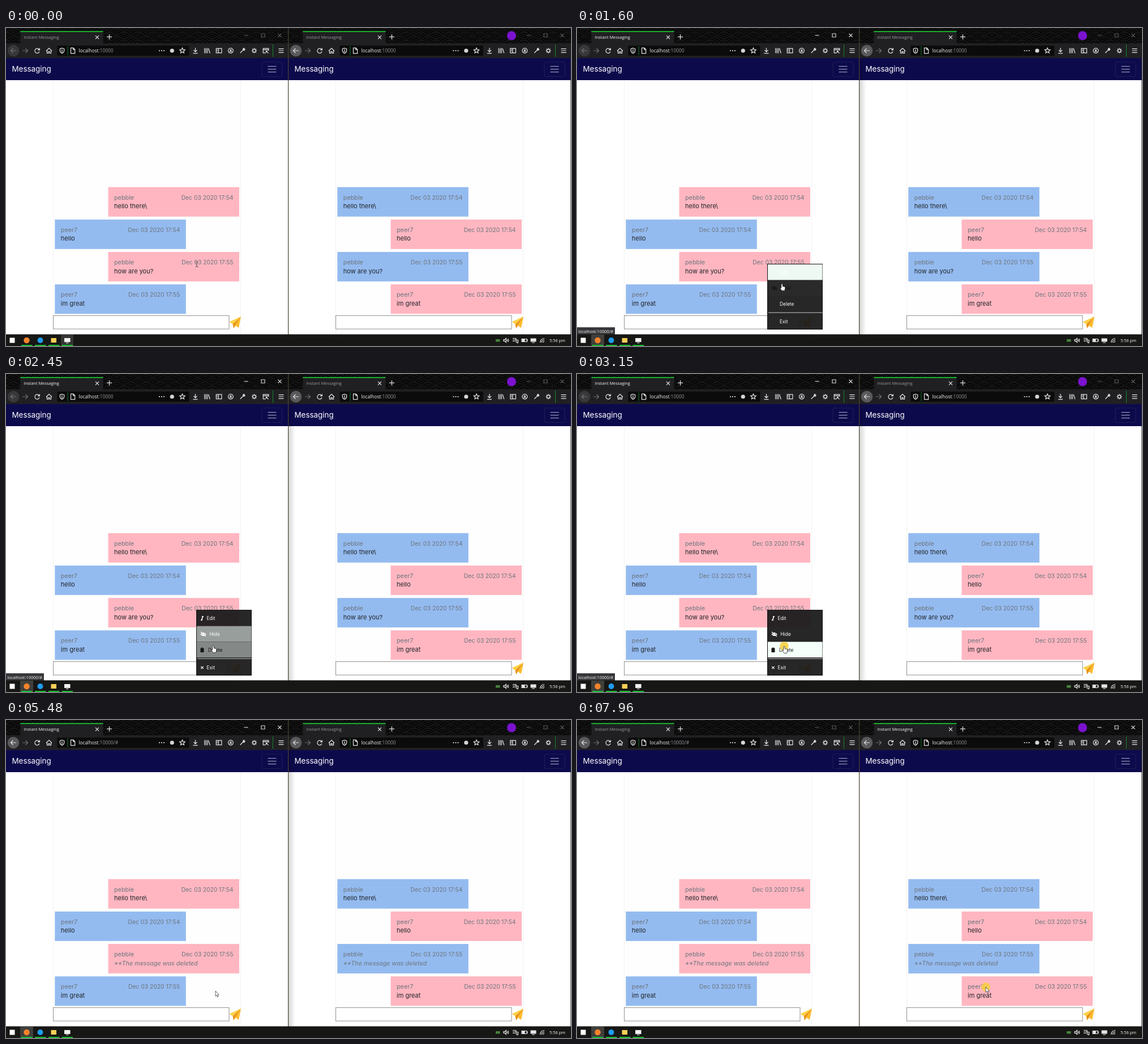
Animation of 998x561 px, one loop 8000 ms. Source, as an HTML page:

```html
<!DOCTYPE html>
<html lang="en">
<head>
<meta charset="utf-8">
<title>Instant Messaging</title>
<style>
html, body { margin: 0; width: 100%; height: 100%; overflow: hidden; background: #fff; }
svg { display: block; width: 100vw; height: 100vh; }
text { font-family: Inter, "Open Sans", sans-serif; font-size: 10.8px; white-space: pre; }
.ui { font-family: "Open Sans", "Noto Sans", sans-serif; font-size: 7.4px; }
.url { font-size: 8.4px; }
.muted { fill: #6c757d; }
.time { font-size: 10.3px; text-anchor: end; }
.body { fill: #212529; font-size: 11px; }
.gone { fill: #6c757d; font-style: italic; }
.item { font-size: 8.4px; }
.icon { fill: none; stroke: #e6e6e8; stroke-width: 1.2; }
</style>
</head>
<body>
<svg id="stage" viewBox="0 0 998 561" preserveAspectRatio="none"></svg>
<script>
const LOOP = 8000;
const stage = document.getElementById('stage');
const $ = id => document.getElementById(id);

const rect = (x, y, w, h, fill, more = '') =>
  `<rect x="${x}" y="${y}" width="${w}" height="${h}" fill="${fill}" ${more}/>`;
const dot = (x, y, r, fill, more = '') =>
  `<circle cx="${x}" cy="${y}" r="${r}" fill="${fill}" ${more}/>`;
const text = (x, y, s, cls, more = '') =>
  `<text x="${x}" y="${y}" class="${cls}" ${more}>${s}</text>`;
const icon = (x, y, d, more = '') =>
  `<path class="icon" transform="translate(${x} ${y})" d="${d}" ${more}/>`;

const circle = r => `M${-r} 0a${r} ${r} 0 1 0 ${2 * r} 0a${r} ${r} 0 1 0 ${-2 * r} 0`;
const spokes = Array.from({ length: 8 }, (_, i) => {
  const a = i * Math.PI / 4, c = Math.cos(a), s = Math.sin(a);
  return `M${(3 * c).toFixed(2)} ${(3 * s).toFixed(2)}L${(4.7 * c).toFixed(2)} ${(4.7 * s).toFixed(2)}`;
}).join('');
const starPath = 'M' + Array.from({ length: 10 }, (_, i) => {
  const r = i % 2 ? 2.3 : 5, a = (i / 5 - .5) * Math.PI;
  return `${(r * Math.cos(a)).toFixed(2)} ${(r * Math.sin(a)).toFixed(2)}`;
}).join('L') + 'Z';

const GLYPH = {
  back: 'M5 0H-4.5M-.5-4L-4.5 0L-.5 4',
  forward: 'M-5 0H4.5M.5-4L4.5 0L.5 4',
  reload: 'M3.5-2A4.1 4.1 0 1 0 4 1.5M4.4-4.6V-1.3H1',
  home: 'M-5 .5L0-4.5L5 .5M-3.5 0V4.5H-1V1.5H1V4.5H3.5V0',
  shield: 'M0-4.5L3.7-3.3V0Q3.5 3 0 4.7Q-3.5 3-3.7 0V-3.3ZM0-2.5V2.7',
  page: 'M-3.5-4.8H1L3.7-2V4.8H-3.5ZM.8-4.8V-1.8H3.7',
  star: starPath,
  download: 'M0-5V2M-3-1L0 2.2L3-1M-4 4.7H4',
  library: 'M-4.5-4.5V4.5M-2-4.5V4.5M.5-4.5V4.5M2.2-4L5 4.5',
  sidebar: 'M-4.8-3.8H4.8V3.8H-4.8ZM-.8-3.8V3.8M-3.6-1.5H-2M-3.6.5H-2',
  account: circle(4.4) + 'M-2.5 2.5Q0 .5 2.5 2.5M-1-1.3H1V0H-1Z',
  wrench: 'M-4 4L1-1M1-1Q.5-4 3-4.3L2.3-2.3L4.3-2.6Q4 0 1-1',
  gear: circle(2.7) + spokes,
  capture: 'M4.8 0V-3.8H-4.8V3.8H0M-4.8-1.7H4.8M.5.7L4.5 4.7M.5 3V.7H3',
  burger: 'M-4.5-3.3H4.5M-4.5 0H4.5M-4.5 3.3H4.5',
  plus: 'M-4.5 0H4.5M0-4.5V4.5',
  close: 'M-3-3L3 3M3-3L-3 3'
};

const PINK = '#ffb6c1', BLUE = '#94bbf0';
const NAMES = ['pebble', 'peer7'];
const CHAT = [[0, '54', 'hello there\\'], [1, '54', 'hello'], [0, '55', 'how are you?'], [1, '55', 'im great']];

function bubble([who, minute, words], row, me) {
  const mine = who === me, x = mine ? 180.5 : 86.3, y = 280.7 + row * 57.2;
  const body = row === 2
    ? text(x + 10.5, y + 37.5, words, 'body live') + text(x + 10.5, y + 37.5, '**The message was deleted', 'gone')
    : text(x + 10.5, y + 37.5, words, 'body');
  return rect(x, y, 231.5, 52, mine ? PINK : BLUE)
    + text(x + 10.5, y + 22, NAMES[who], 'muted')
    + text(x + 221, y + 22, `Dec 03 2020 17:${minute}`, 'muted time') + body;
}

function browser(me, x0) {
  const id = me ? 'right' : 'left';
  const shift = me ? 20.5 : 0;
  const tools = ['download', 'library', 'sidebar', 'account', 'wrench', 'gear'];
  const bold = 'stroke-width="1.5"';
  return `<g transform="translate(${x0} 0)">`
    + rect(0, 0, 499, 561, '#fff')
    + rect(0, 0, 499, 28, '#050505') + rect(0, 0, 499, 28, 'url(#scales)')
    + rect(25.5, 5.5, 146, 22.5, '#202022') + rect(25.5, 5.5, 146, 1.6, '#16d52f')
    + text(31.5, 19, 'Instant Messaging', 'ui', `id="${id}Title"`)
    + icon(161, 16.3, GLYPH.close, bold) + icon(182.5, 15.7, GLYPH.plus, bold)
    + (me ? dot(394, 13.5, 8, '#7b12cf') : '')
    + `<g id="${id}Buttons">${icon(424, 13, 'M-3.5 0H3.5', 'stroke-width="1"')}
       ${icon(454, 13, 'M-3-3H3V3H-3Z', 'stroke-width="1"')}${icon(483.5, 13, GLYPH.close, 'stroke-width="1"')}</g>`
    + rect(0, 27, 499, 26, '#202022')
    + `<g id="${id}Back">${dot(13, 40, 10.3, '#5a5a5d')}${icon(13, 40, GLYPH.back, bold)}</g>`
    + icon(34, 40, GLYPH.forward, 'opacity=".4"')
    + icon(55, 40, GLYPH.reload, bold) + icon(76, 40, GLYPH.home, bold)
    + rect(90.5, 31, 233 + shift, 18, '#0b0b0c', 'rx="1.5"')
    + icon(99, 40, GLYPH.shield) + rect(108.5, 32, 1, 16, '#13752a') + icon(118, 40, GLYPH.page)
    + `<text x="128.3" y="43" class="ui url" fill="#f4f4f5">localhost<tspan fill="#96969a">:10000</tspan>`
    + (me ? '' : '<tspan id="hash" fill="#96969a">/#</tspan>') + '</text>'
    + [-4, 0, 4].map(d => dot(275 + shift + d, 40, 1.1, '#e6e6e8')).join('')
    + dot(293.3 + shift, 40, 3.6, '#d5d5d8') + icon(311.5 + shift, 40, GLYPH.star)
    + tools.map((k, i) => icon(334.5 + shift + i * 20.8, 40, GLYPH[k], bold)).join('')
    + (me ? '' : icon(459, 40, GLYPH.capture))
    + rect(471, 29, 1, 22, '#17852f') + icon(486, 40, GLYPH.burger, bold)
    + rect(83.5, 80, 331, 470, '#fefefe', 'stroke="#f2f2f4"')
    + rect(0, 53, 499, 39, '#0d0a4c')
    + text(10.5, 77, 'Messaging', '', 'fill="#fff" style="font-size:13.4px"')
    + rect(452, 60, 36, 25.5, 'none', 'rx="3" stroke="#1d2059"')
    + icon(470, 72.7, 'M-7.5-5H7.5M-7.5 0H7.5M-7.5 5H7.5', 'style="stroke:#8f94b5"')
    + CHAT.map((m, i) => bubble(m, i, me)).join('')
    + rect(83.5, 507.3, 310.5, 23.7, '#fff', 'stroke="#858585" stroke-width=".9"')
    + `<path d="M415 509L394.5 518.5L400.5 522.5Z" fill="#ffd044"/><path d="M415 509L400.5 522.5L402 530L405 525.5Z" fill="#e8941a"/>
       <path d="M415 509L404.5 524.5L411 529Z" fill="#fdbb2c"/>`
    + '</g>';
}

function taskbar() {
  const lines = [27, 51, 75, 98.5].map(x => rect(x, 559, 19.5, 2, '#19bd34')).join('');
  return rect(0, 540.4, 998, 20.6, '#171715')
    + rect(25, 541, 23, 20, '#40403d', 'id="foxTask"') + rect(97, 541, 22, 20, '#353532', 'id="recTask"')
    + lines + rect(6.5, 546.5, 9, 9, '#fff')
    + dot(36.5, 551, 5.2, '#f5842c') + dot(60.5, 551, 5, '#1f9cf0')
    + rect(79.5, 547, 9.5, 8, '#f9cf56')
    + rect(103, 547, 10.5, 7, '#f3f3f3') + rect(106, 555, 4.5, 1, '#f3f3f3')
    + rect(865, 549, 7.5, 4.5, '#47813d')
    + icon(884, 551, 'M-5-1.3H-3L-.7-3.5V3.5L-3 1.3H-5ZM1-1.5Q2 0 1 1.5M2.5-3Q4.5 0 2.5 3', 'stroke-width="1"')
    + icon(900, 551, 'M-5-3.5H1M-5-1H1M-5 1.5H-1M1-3.5V3H4.5V-.5H0M2 4.5H5', 'stroke-width="1"')
    + icon(916, 551, 'M-5-2.5H4V2.5H-5ZM4-1H5V1H4', 'stroke-width="1"') + rect(911.5, 549, 5, 4, '#e6e6e8')
    + rect(926.5, 547.5, 10, 6, '#e6e6e8') + rect(929, 554.5, 5, 1, '#e6e6e8')
    + icon(947, 551, 'M-3.5 4Q-3-3 4-3.5M-1 4Q-.5-.5 4-1M1.5 4Q2 2 4 1.5', 'stroke-width="1"')
    + text(988, 553.8, '5:56 pm', 'ui', 'fill="#fff" text-anchor="end"');
}

// label, top, baseline, text x beside its icon, hover start, hover end
const ITEMS = [
  ['Edit', 417, 434, 354.5, 1190, 1570],
  ['Hide', 444.7, 462, 359.5, 1580, 2310],
  ['Delete', 472.5, 490, 357, 2310, 3310],
  ['Exit', 503.5, 521, 354.5, LOOP, LOOP]
];
const ITEM_ICONS = [
  'M-.5-3.2H2.5M-2.5 3.2H.5M1-3L-1 3',
  'M-4.5 0Q0-5 4.5 0Q0 5-4.5 0M-1.5 0A1.5 1.5 0 0 0 1.5 0A1.5 1.5 0 0 0-1.5 0M-4.5-4L4.5 4',
  'M-3-2.8H3M-1-3.6H1M-2.2-1.5H2.2V3.2H-2.2ZM-.8-1V3M.8-1V3',
  'M-2.2-2.2L2.2 2.2M2.2-2.2L-2.2 2.2'
];
const menu = () => `<g id="menu">`
  + rect(336.5, 416.5, 97, 115, '#1c1c1c', 'fill-opacity=".95" stroke="#151515"')
  + ITEMS.map(([label, top, base], i) =>
      rect(337, top, 96.5, 27.5, '#f5fffa', `id="glow${i}"`)
      + icon(i === 1 ? 348.5 : 346.5, base - 3, ITEM_ICONS[i], `id="mark${i}" style="stroke-width:${i % 2 ? 1.2 : 1.6}"`)
      + text(358, base, label, 'item', `id="label${i}"`)).join('')
  + rect(338, 501.6, 95.5, 1, '#c9cccb') + '</g>';

const arcs = (x, y) => [13, 9.5, 6, 2.5].map(r => dot(x, y, r, '#050505', 'stroke="#222224"')).join('');

stage.innerHTML = `<defs>
  <pattern id="scales" width="26" height="14" patternUnits="userSpaceOnUse">
    ${arcs(0, 7)}${arcs(26, 7)}${arcs(13, 14)}${arcs(0, 21)}${arcs(26, 21)}
  </pattern>
  <linearGradient id="shade"><stop stop-opacity=".16"/><stop offset="1" stop-opacity="0"/></linearGradient>
</defs>`
  + browser(0, 0) + browser(1, 499)
  + rect(499, 53, 12, 488, 'url(#shade)', 'id="shadow"')
  + rect(498, 0, 1.2, 541, '#4b4335') + rect(997.2, 53, .8, 488, '#333')
  + `<g id="status">${rect(0, 528, 67, 13, '#38383b')}${text(2.5, 537.5, 'localhost:10000/#', 'ui', 'fill="#f5f5f5"')}</g>`
  + taskbar() + menu()
  + `<g id="pointer">${dot(0, 0, 7.8, '#f6cf3f', 'id="click" opacity=".88"')}
    <path id="beam" d="M-2.5-4.5Q0-4.5 0-3Q0-4.5 2.5-4.5M0-3V3M-2.5 4.5Q0 4.5 0 3Q0 4.5 2.5 4.5" fill="none" stroke="#444" stroke-width=".9"/>
    <path id="hand" d="M-1.2 1Q0-.8 1.2 1V4.6L4.6 5.4Q6 6 5.8 7.4L4.8 12.5H-.2L-3 8.2Q-3 6.6-1.2 7.6Z" fill="#fff" stroke="#111" stroke-width=".7"/>
    <path id="arrow" d="M0 0V9.3L2.1 7.5L3.6 10.7L4.9 10.1L3.5 7H6.3Z" fill="#fff" stroke="#222" stroke-width=".7"/></g>`;

const PATH = [
  [0, 337, 417], [1199, 337, 417], [1200, 343, 423], [1420, 353, 435], [1600, 362, 451],
  [1980, 365, 463], [2060, 365, 464], [2310, 366, 473], [2450, 366, 479], [2600, 366, 480],
  [5479, 366, 480], [5480, 370, 478], [5690, 455, 443], [5900, 575, 412], [6040, 630, 402],
  [6180, 657, 407], [6250, 662, 413], [6320, 669, 419], [6460, 612, 430], [6530, 583, 434],
  [6640, 636, 439], [6780, 710, 427], [7029, 710, 427], [7180, 718, 450], [7330, 722, 471], [LOOP, 722, 471]
];
const CLICKS = [[280, 420], [3150, 3310], [7960, LOOP]];

function pointerAt(t) {
  const i = Math.max(1, PATH.findIndex(k => k[0] > t));
  const [t0, x0, y0] = PATH[i - 1], [t1, x1, y1] = PATH[i];
  const p = (t - t0) / (t1 - t0);
  return [x0 + (x1 - x0) * p, y0 + (y1 - y0) * p];
}

const fade = (t, start) => {
  const p = Math.min(1, Math.max(0, (t - start) / 300));
  return p * p * (3 - 2 * p);
};
const show = (id, on) => $(id).style.display = on ? '' : 'none';
const live = [...document.querySelectorAll('.live')];
const gone = [...document.querySelectorAll('.gone')];

function render(t) {
  const leftOn = t >= 280 && t < 7960;
  const rightOn = (t >= 70 && t < 280) || t >= 7960;
  for (const [id, on] of [['left', leftOn], ['right', rightOn]]) {
    $(id + 'Title').setAttribute('fill', on ? '#f6f6f7' : '#98989c');
    $(id + 'Buttons').setAttribute('opacity', on ? .9 : .32);
  }
  show('shadow', leftOn);
  show('foxTask', t >= 70);
  show('recTask', t < 70);

  const deleted = t >= 3380;
  live.forEach(e => e.style.display = deleted ? 'none' : '');
  gone.forEach(e => e.style.display = deleted ? '' : 'none');
  show('hash', t >= 3310);
  $('leftBack').setAttribute('opacity', t >= 3310 ? 1 : .42);
  show('status', t >= 1430 && t < 3380);

  show('menu', t >= 350 && t < 3310);
  ITEMS.forEach(([, , , besideX, from, to], i) => {
    const hovered = t >= from && t < to;
    const marked = t >= 1680 || (i === 1 && hovered);
    const ink = hovered ? '#161616' : '#fff';
    $('glow' + i).setAttribute('opacity', fade(t, from) - fade(t, to));
    $('label' + i).setAttribute('x', marked ? besideX : 358);
    $('label' + i).setAttribute('fill', ink);
    $('mark' + i).style.stroke = ink;
    show('mark' + i, marked);
  });

  $('pointer').setAttribute('transform', `translate(${pointerAt(t).join(' ')})`);
  show('click', CLICKS.some(([a, b]) => t >= a && t < b));
  show('beam', t < 1200);
  show('hand', t >= 1200 && t < 3310);
  show('arrow', t >= 3310);
}

let start;
function tick(now) {
  start ??= now;
  render((now - start) % LOOP);
  requestAnimationFrame(tick);
}
render(0);
requestAnimationFrame(tick);
</script>
</body>
</html>
```
